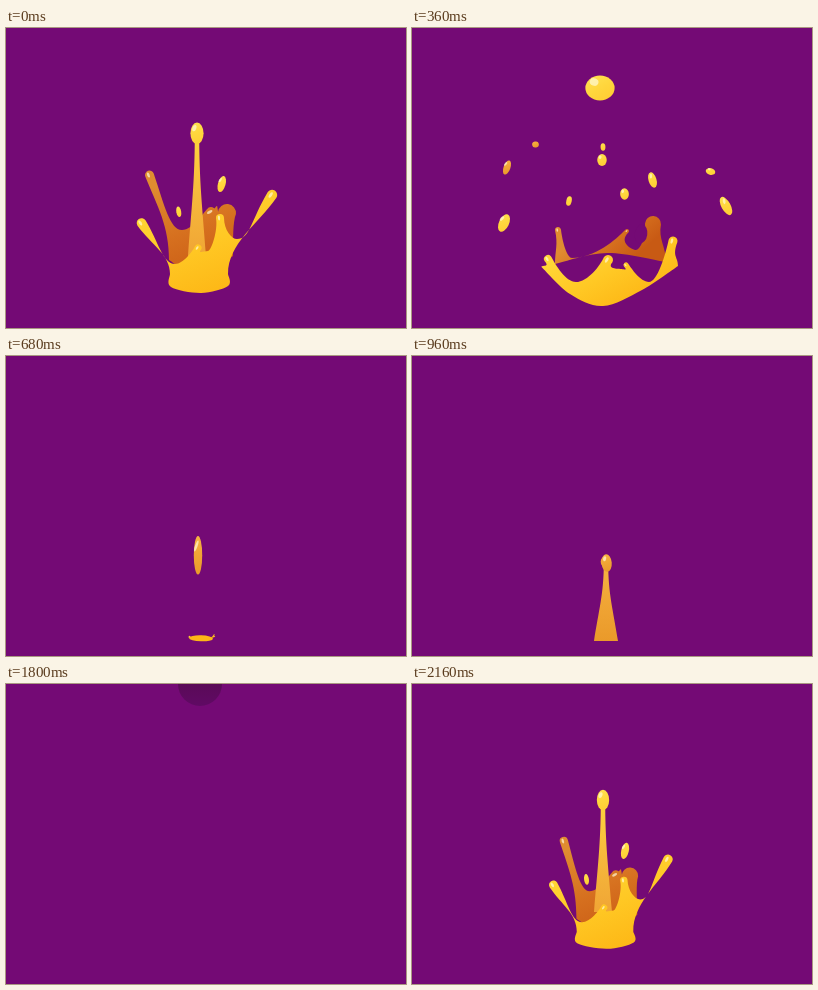
An HTML page with a canvas that plays this animation: 400x300 px, repeating every 2.2 s.

```html
<!DOCTYPE html>
<html lang="en">
<head>
<meta charset="utf-8">
<title>Splash</title>
<style>
html, body { margin: 0; width: 100%; height: 100%; overflow: hidden; background: #740a75; }
canvas { display: block; width: 400px; height: 300px; }
</style>
</head>
<body>
<canvas id="stage" width="400" height="300"></canvas>
<script>
const ctx = document.getElementById('stage').getContext('2d');
const LOOP = 2200, STEP = 40, BG = '#740a75', GRAVITY = .0013;
const YELLOW = ['#ffe04f', '#ffd63d', '#ffcd34'];
const GOLD = ['#ffd636', '#ffc824', '#fdb716'];
const AMBER = ['#f7b443', '#f0a535', '#ea9a2a'];
const RUST = ['#e08c30', '#d6701f', '#c85a14'];

// A wall is a row of peaks [x, y, radius] with dips [x, y] between them,
// then the foot points from right to left. Three stages: burst, spread, fall.
const FRONT = [
  [[135.5,195,4.8], [169,236], [192,220,3.5], [202,223], [214,190,4], [231,211], [266,167,5.2],
    [222,246], [222,258], [195,265], [165,259], [164,246]],
  [[139.5,214,3.6], [166,237], [197,217,4], [208,219], [214,217,2.2], [236,235], [253,194,4],
    [258,240], [230,260], [191,271], [158,262], [138,242]],
  [[136,231,4], [164,254], [196,232,5], [209,241], [214,237,2.5], [237,254], [261,213,4.5],
    [266,238], [230,262], [191,278], [158,266], [129.5,239]]];
const BACK = [
  [[143.5,147,4.5], [176,202], [205,184,5], [211,178], [221,185,9], [227,228], [195,250], [163,232]],
  [[145,173,4], [167,222], [213,182,5], [217,174], [224,176,6.5], [249,232], [188,221], [149,228]],
  [[146,202,3], [160,230], [215,203,2], [224,222], [241,196,8], [254,234], [195,225], [143,236]]];

// Flying drops: place at 200 ms, place at 360 ms, radius, birth.
const DROPS = [
  [107,180, 92,195, 6.8, 60], [164,157, 157,173, 3.6, -100], [229.5,133, 240.5,152, 5.6, -100],
  [212,162, 212.5,166, 5, 60], [190,130, 190,132, 5.3, 40], [190.5,108.5, 191,119, 3, 100]];
// Pairs that stay joined by a strand for a while.
const PAIRS = [
  [AMBER, [109,117, 95,139.5, 5, 80], [136,130.5, 123.5,116.5, 3.2, 80]],
  [YELLOW, [274,154, 298.5,143.5, 4, 80], [292.5,155.5, 314,178, 6.8, 80]]];

const clamp = v => Math.max(0, Math.min(1, v));
const mix = (a, b, u) => a + (b - a) * u;

function shade(colors, x0, y0, x1, y1) {
  const g = ctx.createLinearGradient(x0, y0, x1, y1);
  colors.forEach((c, i) => g.addColorStop(i / (colors.length - 1), c));
  return g;
}

function oval(x, y, rx, ry, turn, fill) {
  ctx.beginPath();
  ctx.ellipse(x, y, Math.max(0, rx), Math.max(0, ry), turn, 0, Math.PI * 2);
  ctx.fillStyle = fill;
  ctx.fill();
}

function glint(x, y, rx, ry, turn) {
  oval(x, y, rx, ry, turn, 'rgba(255,250,215,.7)');
}

function bead(colors, x, y, rx, ry, turn) {
  oval(x, y, rx, ry, turn, shade(colors, x - rx * .5, y - ry, x + rx * .5, y + ry));
  if (rx > 3.2) glint(x - rx * .4, y - ry * .48, rx * .3, ry * .3, turn + .35);
}

// Bursting up, then moving through the stages, then draining to the floor.
function wallAt([a, b, c], t) {
  if (t < 0) {
    const s = 1 - (-t / 230) ** 1.4;
    return a.map(([x, y, ...r]) => [194 + (x - 194) * s ** ((263 - y) / 58),
      263 - (263 - y) * s, ...r.map(v => v * s)]);
  }
  if (t <= 360) {
    const [from, to, u] = t < 200 ? [a, b, t / 200] : [b, c, (t - 200) / 160];
    return from.map((p, i) => p.map((v, j) => mix(v, to[i][j], u)));
  }
  const s = 1 - (t - 360) / 400, sy = s ** 1.5;
  return c.map(([x, y, ...r]) => [195 + (x - 198) * s + 3 * s, 285 - 8 * sy + (y - 277) * sy, ...r.map(v => v * sy)]);
}

function wall(points, colors) {
  const n = points.findLastIndex(p => p.length > 2) + 1;
  const base = points.slice(n), end = base.length - 1;
  const shine = [];
  ctx.beginPath();
  ctx.moveTo(...base[end]);
  for (let i = 0; i < n; i += 2) {
    const [x, y, r] = points[i];
    const from = i ? points[i - 1] : base[end], to = points[i + 1];
    const dx = (from[0] + to[0]) / 2 - x, dy = (from[1] + to[1]) / 2 - y;
    const len = Math.hypot(dx, dy) || 1, ux = dx / len, uy = dy / len;
    const side = (k, along) => [x + ux * along - uy * r * k, y + uy * along + ux * r * k];
    // Dips leave sideways, the outer feet leave upwards.
    const leave = (p, s, foot) => foot ? [p[0], mix(p[1], s[1], .4)] : [mix(p[0], s[0], .42), p[1]];
    const left = side(1, 0), right = side(-1, 0), a = Math.atan2(ux, -uy);
    ctx.bezierCurveTo(...leave(from, left, i === 0), ...side(.75, len * .45), ...left);
    ctx.arc(x, y, r, a, a + Math.PI);
    ctx.bezierCurveTo(...side(-.75, len * .45), ...leave(to, right, i === n - 1), ...to);
    shine.push([x - r * .25, y, r * .28, r * .6, Math.atan2(-ux, uy)]);
  }
  for (let i = 0; i < end; i++) {
    const p = base[i], q = base[i + 1], o = base[Math.max(0, i - 1)], s = base[Math.min(end, i + 2)];
    ctx.bezierCurveTo(p[0] + (q[0] - o[0]) / 6, p[1] + (q[1] - o[1]) / 6,
      q[0] - (s[0] - p[0]) / 6, q[1] - (s[1] - p[1]) / 6, ...q);
  }
  const ys = points.map(p => p[1]);
  ctx.fillStyle = shade(colors, 180, Math.min(...ys), 215, Math.max(...ys));
  ctx.fill();
  shine.forEach(s => s[2] < 1.8 && glint(...s));
}

// A jet that widens towards its foot.
function jet(x, top, foot, thin, wide, colors) {
  const h = foot - top;
  ctx.beginPath();
  ctx.moveTo(x - wide, foot);
  ctx.bezierCurveTo(x - wide * .6, foot - h * .4, x - thin, top + h * .4, x - thin, top);
  ctx.arc(x, top, thin, Math.PI, Math.PI * 2);
  ctx.bezierCurveTo(x + thin, top + h * .4, x + wide * .6, foot - h * .4, x + wide, foot);
  ctx.fillStyle = shade(colors, 0, top, 0, foot);
  ctx.fill();
}

// Ballistic path; the faster it goes, the longer the drop gets.
function flight([x1, y1, x2, y2, r], t) {
  const s = (t - 200) / 160;
  const x = mix(x1, x2, Math.min(s, .6 + .4 * s));
  const y = mix(y1, y2, s) + GRAVITY / 2 * (t - 200) * (t - 360);
  const vx = (x2 - x1) / 160, vy = (y2 - y1) / 160 + GRAVITY * (t - 280);
  const stretch = Math.sqrt(Math.min(2.2, 1 + 18 * (vx * vx + vy * vy)));
  const size = r * (1 - .7 * clamp((t - 360) / 240));
  return [x, y, size / stretch, size * stretch, Math.atan(-vx / vy)];
}

function flyingDrops(t) {
  if (t >= 600) return;
  for (const d of DROPS) if (t >= d[5]) bead(YELLOW, ...flight(d, t));
  for (const [colors, ...pair] of PAIRS) {
    if (t < pair[0][5]) continue;
    const [a, b] = pair.map(d => flight(d, t));
    if (t < 300) {
      ctx.beginPath();
      ctx.moveTo(a[0], a[1]);
      ctx.quadraticCurveTo((a[0] + b[0]) / 2, (a[1] + b[1]) / 2 + 16, b[0], b[1]);
      ctx.lineWidth = (300 - t) * .045;
      ctx.strokeStyle = colors[1];
      ctx.stroke();
    }
    bead(colors, ...a);
    bead(colors, ...b);
  }
}

const headY = t => Math.max(43 - t, 60 + (t < 360 ? .00035 : .00136) * (t - 360) ** 2);

function head(t) {
  if (t < -200 || t > 740) return;
  const d = Math.abs(t - 360), size = 13.5 - .014 * d;
  const aspect = Math.sqrt(Math.min(t < 360 ? 1.65 : 9, .85 + 3.66e-5 * d * d));
  bead(t > 520 ? AMBER : YELLOW, mix(191, 188, clamp(t / 200)) + 4 * clamp((t - 360) / 320),
    headY(t), size / aspect, size * aspect, 0);
}

function ball(t) {
  const s = (t + 400) / 160;
  if (s < 0 || s > 1.3) return;
  const y = 170 * s + 85 * s * s;
  ctx.save();
  ctx.beginPath();
  ctx.rect(0, 0, 400, 262);
  ctx.clip();
  oval(194, y, 22, 22, 0, shade(['#540a4c', '#600a64'], 194, y - 22, 194, y + 22));
  ctx.restore();
}

function crown(t) {
  if (t < -200 || t >= 760) return;
  if (t < 520) wall(wallAt(BACK, t), RUST);
  const hole = clamp((t - 80) / 120) * clamp((460 - t) / 100), u = (t - 200) / 160;
  oval(mix(213, 229, u), mix(194, 206, u), 6.3 * hole, 9.5 * hole, .15, BG);
  const top = t < 60 ? headY(t) : 146 + t * .235;
  if (top < 222) jet(191 + clamp(t / 200) * 2, top, 228, t < 60 ? 2.2 : 3, 9, [YELLOW[1], '#f6b93c', AMBER[1]]);
  wall(wallAt(FRONT, t), GOLD);
  if (t > 480) oval(195, 282.3, 60 * (760 - t) / 400, 3, .03, GOLD[2]);
}

// The falling head throws up a second jet that breaks into three drops.
function rebound(t) {
  if (t < 760 || t > 1400) return;
  const y = 150 + Math.hypot(10, .33 * (t - 1130)), age = Math.max(0, t - 940);
  const top = t < 1020 ? y : mix(y, 284, (t - 1020) / 100);
  if (t < 1120) jet(194, top, 285, 2.2, 12 * clamp((1140 - t) / 120), AMBER);
  const part = clamp(age / 200);
  bead(AMBER, 194 - .034 * age, y - 15 * part, 2.6, 2.9, 0);
  bead(AMBER, 194 - .045 * age, y - 12.5 * part, 4.4, 5.3, 0);
  bead(AMBER, 194 + .033 * age, y, 5.1, mix(6, 13, clamp((t - 760) / 500)), -.08);
}

function draw(t) {
  ctx.fillStyle = BG;
  ctx.fillRect(0, 0, 400, 300);
  ball(t);
  crown(t);
  head(t);
  flyingDrops(t);
  rebound(t);
}

function tick(now) {
  const t = Math.floor((now % LOOP) / STEP) * STEP;
  draw(t >= 1800 ? t - LOOP : t);
  requestAnimationFrame(tick);
}
draw(0);
requestAnimationFrame(tick);
</script>
</body>
</html>
```
